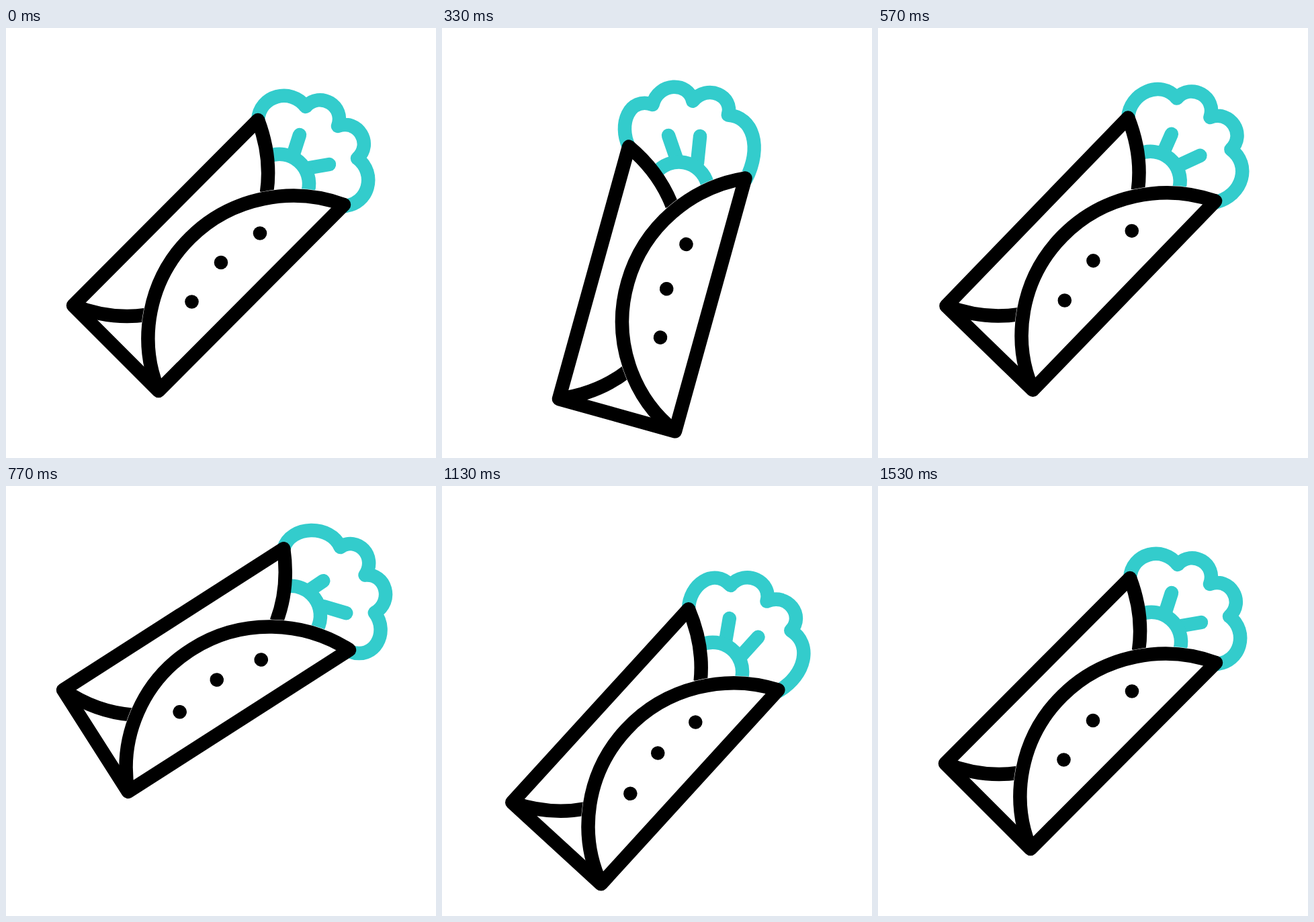
An HTML page that plays this animation: 640x640 px, repeating every 2000 ms.

```html
<!DOCTYPE html>
<html lang="en">
<head>
<meta charset="utf-8">
<title>Wrap</title>
<style>
html, body { margin: 0; width: 100%; height: 100%; overflow: hidden; background: #fff; }
svg { display: block; width: 100%; height: 100%; }
.line, .leaf { fill: none; stroke: #000; stroke-width: 20.5; stroke-linejoin: round; }
.leaf { stroke: #33cccc; }
.gap { fill: #fff; stroke: #fff; stroke-width: 21.4; }
.round { stroke-linecap: round; }
</style>
</head>
<body>
<svg viewBox="0 0 640 640">
  <defs>
    <path id="flap" d="M503 263C427 235 336 251 274.5 312C211.5 374 196 465 227 540"/>
  </defs>
  <g id="wrap">
    <path id="stems" class="leaf round"/>
    <path class="leaf" d="M390 191.3A44 44 0 0 1 449.6 243"/>
    <path id="salad" class="leaf round"/>
    <path class="line" d="M375 137C386 166 394 204 388 245M100 413C129 424.5 167 433 208.5 427"/>
    <use href="#flap" class="gap"/>
    <use href="#flap" class="line"/>
    <path class="line round" d="M375 137L100 413L227 540L503 263"/>
    <circle cx="378" cy="305.5" r="10.3"/>
    <circle cx="320" cy="349" r="10.3"/>
    <circle cx="276.5" cy="407.5" r="10.3"/>
  </g>
</svg>
<script>
const LOOP = 2000, FPS = 30;
const $ = id => document.getElementById(id);

// Key poses as [frame, value], eased in and out between them
const turn = [[0, 0], [11, -30.1], [21, 15], [31, -9.5], [37, 4.5], [46, 0]];
const lift = [[0, 0], [12.5, 48], [22, -62], [34, 48.5], [46, 0]];
const bendLeft = [[0, 0], [10, 1], [23, 0], [28, 1], [45.5, 0]];
const bendRight = [[10, 0], [23, 1], [28, 0]];

// Half of the leaf outline as curve points; the other half mirrors it
const half = [[375, 137], [377.5, 100], [423.6, 88], [446, 117], [467.4, 93.4], [505, 116]];
const mirror = ([x, y]) => [640 - y, 640 - x];
const outline = [...half, [494, 146], ...half.map(mirror).reverse()];

// Each stem pivots on its base; the tip follows the bend
const stems = [
  { base: [428, 187], tip: [437, 159], left: [-2.5, -7.6], right: [6, 12] },
  { base: [452, 208], tip: [481, 203], left: [-6, -27.5], right: [5.5, 7.5] }
];

function at(track, f) {
  const i = track.findIndex(([key]) => f < key);
  if (i === 0) return track[0][1];
  if (i < 0) return track[track.length - 1][1];
  const [f0, a] = track[i - 1], [f1, b] = track[i];
  const u = (f - f0) / (f1 - f0);
  return a + (b - a) * u * u * (3 - 2 * u);
}

const shift = ([x, y], left, right, l, r) =>
  [x + left[0] * l + right[0] * r, y + left[1] * l + right[1] * r]
    .map(v => v.toFixed(2)).join(" ");

// The sway changes evenly along the outline; the rim ends hold still
function saladPath(l, r) {
  const last = outline.length - 1;
  const points = outline.map((p, i) => i < 2 || i === last ? p.join(" ") :
    shift(p, [2.2 * i - 16, -13 - 1.4 * i], [14 - i, 1.2 * i - 4], l, r));
  return `M${points[0]}C${points.slice(1).join(" ")}`;
}

const stemPath = (l, r) => stems.map(s =>
  `M${s.base.join(" ")}L${shift(s.tip, s.left, s.right, l, r)}`).join("");

function draw(ms) {
  const f = Math.floor((ms % LOOP + 3.5) * FPS / 1000) % (LOOP * FPS / 1000);
  const l = at(bendLeft, f), r = at(bendRight, f);
  $("salad").setAttribute("d", saladPath(l, r));
  $("stems").setAttribute("d", stemPath(l, r));
  $("wrap").setAttribute("transform",
    `translate(0 ${at(lift, f).toFixed(2)}) rotate(${at(turn, f).toFixed(2)} 320 320)`);
}

const start = performance.now();
function tick() {
  draw(Math.max(0, performance.now() - start));
  requestAnimationFrame(tick);
}
tick();
</script>
</body>
</html>
```
